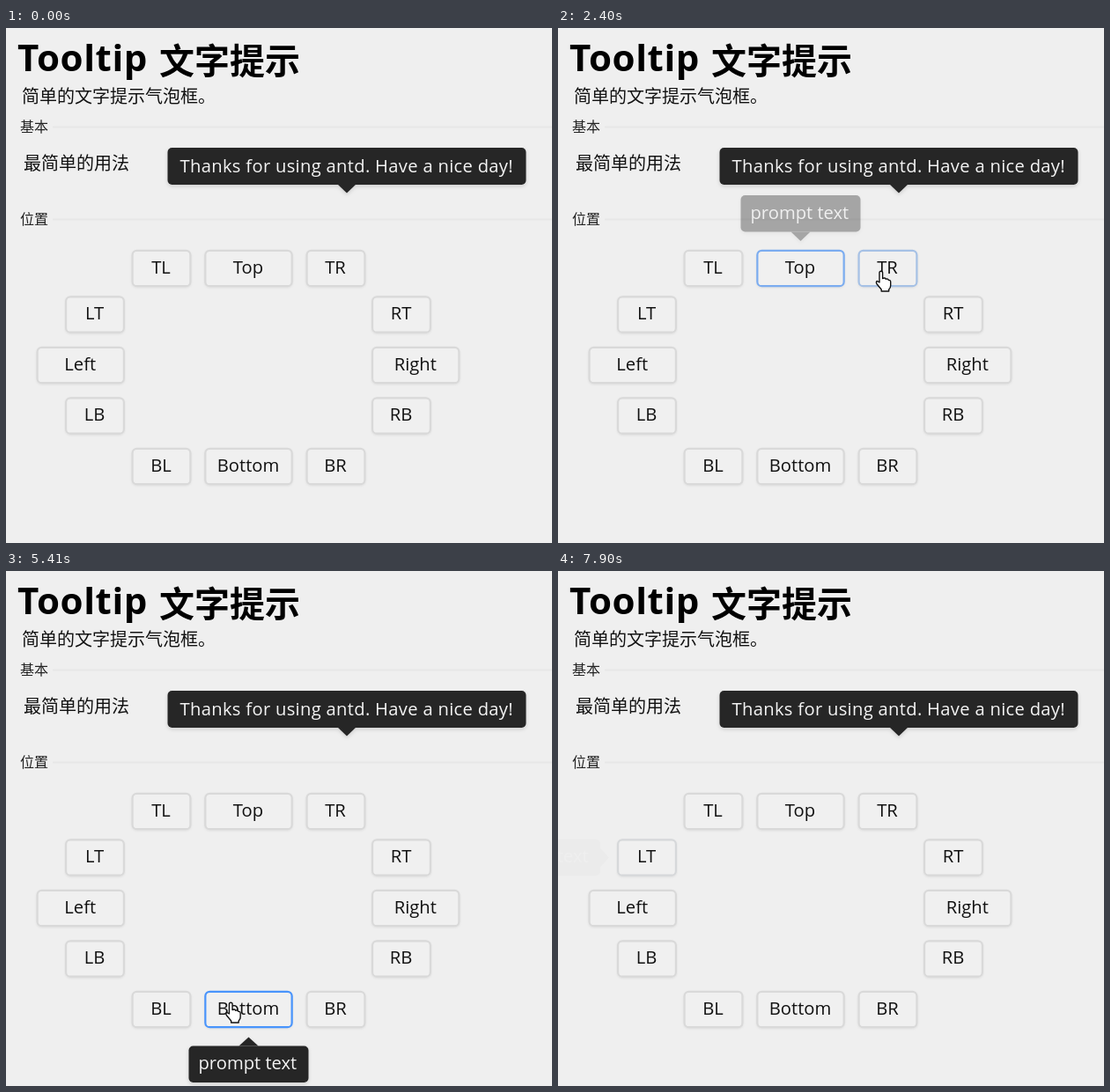
Write an HTML page that moves like this. It is 620 by 585 pixels and loops after 8.13 s.

```html
<!DOCTYPE html>
<html lang="zh">
<head>
<meta charset="utf-8">
<title>Tooltip</title>
<style>
  html, body { margin: 0; width: 100%; height: 100%; overflow: hidden; background: #efefef; }
  svg { display: block; }
  text { font: 20.2px "Open Sans", "Noto Sans CJK SC", "Noto Sans CJK", sans-serif; fill: #111; }
  .cjk { font-family: "Noto Sans CJK SC", "Noto Sans CJK", sans-serif; font-size: 20px; }
  .title { font-size: 42px; font-weight: bold; letter-spacing: .6px; fill: #000; }
  .title.cjk { font-size: 40px; letter-spacing: 0; }
  .small { font-size: 16px; fill: #222; }
  .button rect { fill: #f0f0f0; stroke-width: 2.2; filter: drop-shadow(0 1px 1px #0001); }
  .button text { text-anchor: middle; }
  .tip { fill: #262626; filter: drop-shadow(0 2px 2px #0002); }
  .tip text { fill: #f4f4f4; }
</style>
</head>
<body>
<svg id="stage" width="620" height="585" viewBox="0 0 620 585"></svg>
<script>
const LOOP = 8130;
const BUTTON_H = 42.5, TIP_W = 136, TIP_H = 41.5;
const GLIDE = 260, SETTLE = 80;  // pointer travel before and after it enters a button

const sides = {
  top: ['TL', 'Top', 'TR'],
  bottom: ['BL', 'Bottom', 'BR'],
  left: ['LT', 'Left', 'LB'],
  right: ['RT', 'Right', 'RB']
};

// pointer stops: time of entry, resting point, button if any
const stops = [
  [-10, 320, 450], [400, 218, 240], [740, 15, 81],
  [1070, 165, 255, 'TL'], [1710, 262, 277, 'Top'], [2320, 367, 276, 'TR'],
  [2980, 436, 321, 'RT'], [3530, 450, 385, 'Right'], [4080, 440, 440, 'RB'],
  [4310, 363, 485, 'BR'], [4940, 285, 490, 'Bottom'], [5550, 180, 490, 'BL'],
  [6170, 114, 447, 'LB'], [6410, 85, 398, 'Left'], [7040, 100, 325, 'LT'],
  [7675, 140, 375]
];

const clamp = v => Math.max(0, Math.min(1, v));
const mix = (a, b, k) => a + (b - a) * k;
const get = id => document.getElementById(id);

// Each side holds three buttons; i is -1, 0 or 1 along it.
function layout(name, side, i) {
  const w = i ? 68 : 100.5;
  const column = side === 'left' ? 135 - w / 2 : 415 + w / 2;
  const level = side === 'top' || side === 'bottom';
  const cx = level ? 275.5 + i * 99 : column;
  const cy = level ? (side === 'top' ? 273 : 498) : 383 + i * 57.5;
  const tipX = {
    left: cx - w / 2 - 19 - TIP_W,
    right: cx + w / 2 + 20
  }[side] ?? cx - TIP_W / 2 - i * 37;
  const tipY = { top: 190, bottom: 539.5 }[side] ?? cy - TIP_H / 2;
  const stop = stops.findIndex(s => s[3] === name);
  return {
    name, side, w, cx, cy, tipX, tipY,
    x: cx - w / 2, y: cy - BUTTON_H / 2,
    enter: stops[stop][0], leave: stops[stop + 1][0]
  };
}

const buttons = Object.entries(sides).flatMap(([side, names]) =>
  names.map((name, n) => layout(name, side, n - 1)));

const label = (x, y, text, cls = '') => `<text x="${x}" y="${y}" class="${cls}">${text}</text>`;

const bubble = (x, y, w, h, arrow, text) =>
  `<rect x="${x}" y="${y}" width="${w}" height="${h}" rx="5"/><path d="${arrow}"/>${text}`;

const button = ({ name, x, y, w, cx }) =>
  `<g class="button"><rect id="${name}" x="${x + 1.1}" y="${y + 1.1}" width="${w - 2.2}"
    height="${BUTTON_H - 2.2}" rx="5"/>${label(cx - 0.5, y + 27, name)}</g>`;

function tooltip({ name, side, cx, cy, tipX: x, tipY: y }) {
  const arrow = {
    top: `M${cx - 11} ${y + TIP_H}h22l-11 10.5z`,
    bottom: `M${cx - 11} ${y}h22l-11-10z`,
    left: `M${x + TIP_W} ${cy - 11}v22l10-11z`,
    right: `M${x} ${cy - 11}v22l-10-11z`
  }[side];
  const text = label(x + 11, y + 26.5, 'prompt text');
  return `<g class="tip" id="tip${name}">${bubble(x, y, TIP_W, TIP_H, arrow, text)}</g>`;
}

get('stage').innerHTML = `
  ${label(13, 49, 'Tooltip', 'title')}
  ${label(174, 52, '文字提示', 'title cjk')}
  ${label(18, 85, '简单的文字提示气泡框。', 'cjk')}
  ${label(16, 118, '基本', 'cjk small')}
  ${label(20, 161, '最简单的用法', 'cjk')}
  ${label(16, 223, '位置', 'cjk small')}
  <path d="M53 112.5H620M53 217.5H620" stroke="#e7e7e7" stroke-width="2"/>
  <g class="tip">${bubble(183.5, 136, 407, 42, 'M376 177h22l-11 10.5z',
    '<text x="197.5" y="164" letter-spacing=".3">Thanks for using antd. Have a nice day!</text>')}</g>
  ${buttons.map(button).join('')}
  ${buttons.map(tooltip).join('')}
  <g id="pointer" fill="#fff" stroke="#111" stroke-linejoin="round">
    <path id="arrow" d="M0 0V16l3.8-3.6 3 6.6 2.6-1.1-3-6.5H12z"/>
    <path id="hand" stroke-width="1.4" d="M-2 13V2a1.8 1.8 0 0 1 3.6 0V8.5q3-1.3 3.5.7
      q2.8-.8 3.2 1.2q2.4-.4 2.4 2v4q0 2.6-2 4.6v2H.2v-2L-5 14.7q-1.4-2.6.6-3.2z"/>
  </g>`;

const show = (id, on) => get(id).setAttribute('visibility', on ? 'visible' : 'hidden');

function drawButton({ name, enter, leave }, t) {
  const held = Math.min(t, leave) - enter;
  const gone = Math.max(0, t - leave);
  const glow = clamp(held / 230) * clamp(1 - gone / 230);
  get(name).setAttribute('stroke', `rgb(${[72, 148, 252].map(c => mix(217, c, glow))})`);
  get('tip' + name).setAttribute('opacity',
    clamp((held - 300) / 120) * clamp(1 - gone / 300) ** 3.2);
}

function drawPointer(t) {
  const next = stops.findIndex(s => s[0] + SETTLE > t);
  const visible = next !== 0 && t < 7830;
  const [t0, x0, y0] = stops.at(next < 0 ? -1 : Math.max(0, next - 1));
  const [t1, x1, y1] = stops.at(next);
  const begin = Math.max(t0 + SETTLE, t1 - GLIDE);
  const k = clamp((t - begin) / (t1 + SETTLE - begin));
  const ease = (1 - Math.cos(Math.PI * k)) / 2;
  const x = mix(x0, x1, ease), y = mix(y0, y1, ease);
  const over = buttons.some(b =>
    Math.abs(x - b.cx) < b.w / 2 && Math.abs(y - b.cy) < BUTTON_H / 2);
  get('pointer').setAttribute('transform', `translate(${x} ${y})`);
  show('hand', visible && over);
  show('arrow', visible && !over);
}

const start = performance.now();
function tick() {
  const t = (performance.now() - start) % LOOP;
  buttons.forEach(b => drawButton(b, t));
  drawPointer(t);
  requestAnimationFrame(tick);
}
tick();
</script>
</body>
</html>
```
